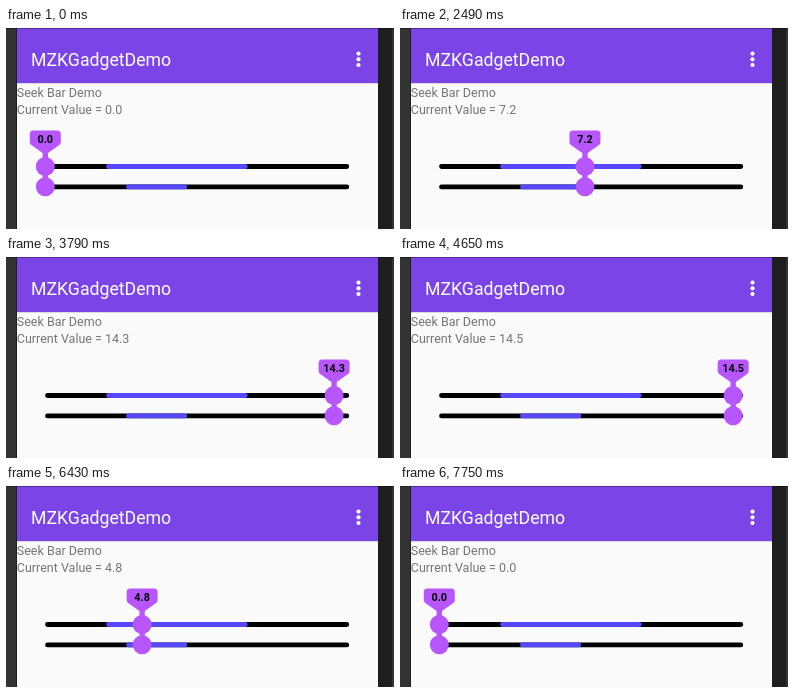
An HTML page that plays this animation: 388 by 201 pixels, repeating every 9.52 s.

```html
<!DOCTYPE html>
<html lang="en">
<head>
<meta charset="utf-8">
<title>Seek Bar Demo</title>
<style>
  html, body { margin: 0; width: 100%; height: 100%; overflow: hidden; background: #fafafa; }
  svg { display: block; width: 388px; height: 201px; font-family: Roboto, sans-serif; }
  .track { stroke: #000; stroke-width: 4.8; stroke-linecap: round; }
  .range { stroke: #5548ff; }
  .note { font-size: 12.5px; fill: #757575; }
  #thumb { fill: #b856fd; }
  #tip { font-size: 10.8px; font-weight: 700; fill: #000; text-anchor: middle; }
</style>
</head>
<body>
<svg viewBox="0 0 388 201">
  <rect width="388" height="201" fill="#333"/>
  <rect x="10" width="376" height="201" fill="#1e1e1e"/>
  <rect x="11" width="361" height="201" fill="#fafafa"/>
  <rect x="11" width="361" height="56" fill="#dcd8e4"/>
  <rect x="11" width="361" height="55" fill="#7b44e6"/>
  <rect width="388" height="1" fill="#000" opacity=".35"/>
  <text x="25" y="38" font-size="17.7" fill="#fff">MZKGadgetDemo</text>
  <g fill="#fff">
    <circle cx="352.5" cy="25.6" r="2.1"/>
    <circle cx="352.5" cy="31.3" r="2.1"/>
    <circle cx="352.5" cy="37" r="2.1"/>
  </g>
  <text class="note" x="10.8" y="69">Seek Bar Demo</text>
  <text class="note" x="10.8" y="86" id="note"></text>
  <path class="track" d="M41.5 138.5H340.8M41.5 158.9H340.8"/>
  <path class="track range" d="M102.5 138.5H239.3M122.5 158.9H178.8"/>
  <g id="thumb">
    <path d="M-12 102.5H12Q15.5 102.5 15.5 106V114Q15.5 116 14 117L2.7 125V158H-2.7V125L-14 117Q-15.5 116 -15.5 114V106Q-15.5 102.5 -12 102.5Z"/>
    <circle cy="138.5" r="9.5"/>
    <circle cy="158.7" r="9.5"/>
    <text id="tip" y="115"></text>
  </g>
</svg>
<script>
const LOOP = 9520, TICK = 77.5, LEFT = 39.3, UNIT = 304 / 15;

// Turning points of the drag: [tick, value]
const drag = [
  [0, 0], [9, 0], [15, 0.8], [19, 3.23], [21, 3.8], [26, 4.6], [42, 11.5], [47, 14],
  [51, 15], [59, 15], [60, 14.5], [70, 9.73], [79, 6.6], [83, 4.17], [86, 2.9],
  [92, 2.8], [100, 0], [123, 0]
];

function valueAt(tick) {
  const i = drag.findIndex(([end]) => end > tick);
  const [t0, v0] = drag[i - 1], [t1, v1] = drag[i];
  return v0 + (v1 - v0) * (tick - t0) / (t1 - t0);
}

const [note, thumb, tip] = ["note", "thumb", "tip"].map(id => document.getElementById(id));
const began = performance.now();

function draw() {
  const time = (performance.now() - began) % LOOP;
  const value = valueAt(Math.floor(time / TICK));
  const label = value.toFixed(1);
  thumb.setAttribute("transform", `translate(${LEFT + value * UNIT} 0)`);
  tip.textContent = label;
  note.textContent = "Current Value = " + label;
  requestAnimationFrame(draw);
}
draw();
</script>
</body>
</html>
```
